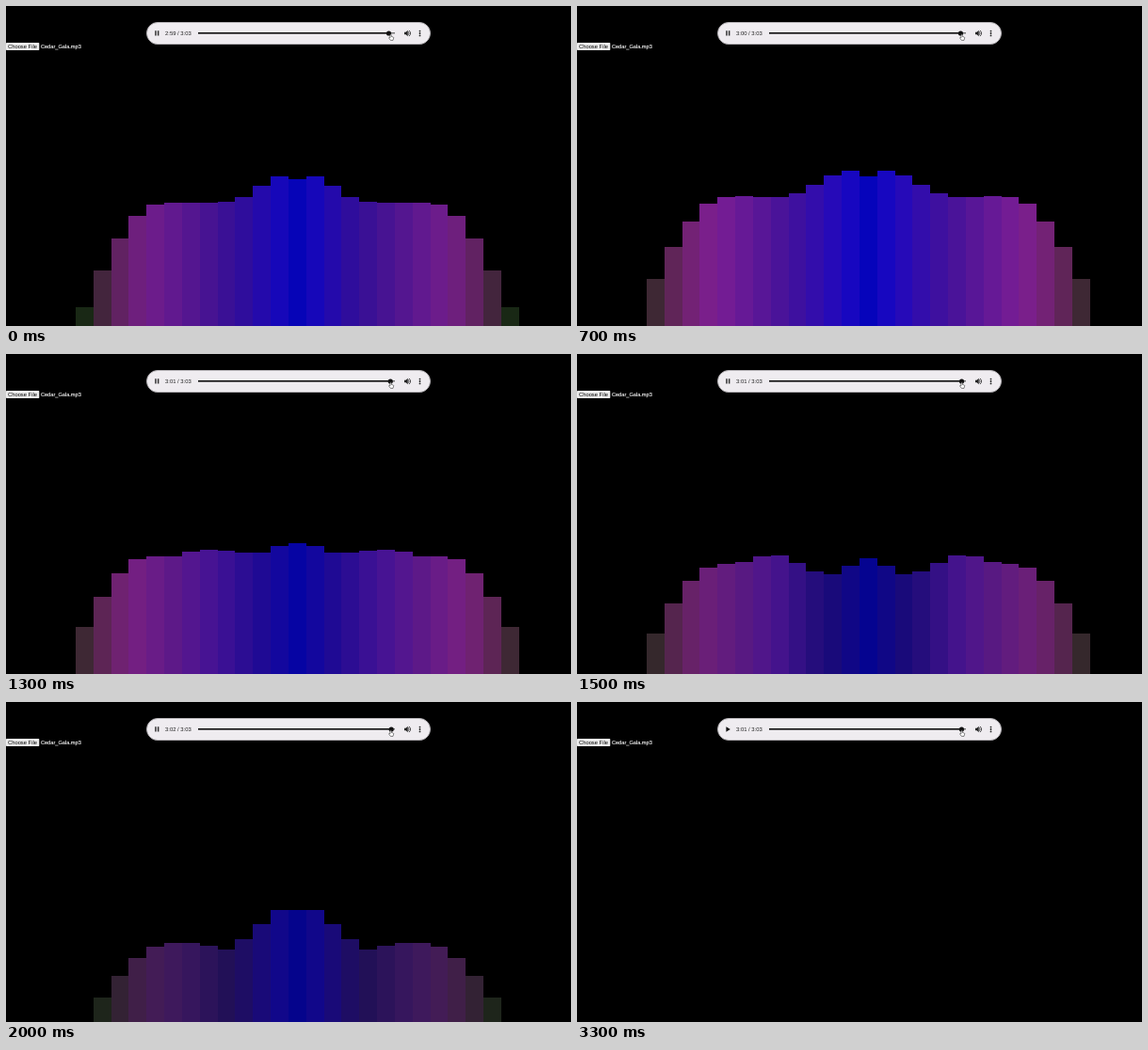
These frames come from a looping animation (600 px wide and 340 px high, 3500 ms). An HTML page:

```html
<!DOCTYPE html>
<html lang="en">
<head>
<meta charset="utf-8">
<title>Audio visualizer</title>
<style>
  html, body { margin: 0; width: 100%; height: 100%; overflow: hidden; background: #000; }
  svg { display: block; width: 600px; height: 340px; }
  text { font-family: "Liberation Sans", Arial, sans-serif; font-size: 5.8px; text-rendering: geometricPrecision; }
</style>
</head>
<body>
<svg viewBox="0 0 600 340">
  <g id="bars" shape-rendering="crispEdges"></g>

  <rect y="39" width="35.3" height="8" rx=".8" fill="#eee"/>
  <text x="2" y="45" fill="#000">Choose File</text>
  <text x="36.9" y="45" fill="#fff" stroke="#fff" stroke-width=".12" style="font-size:5.65px">Cedar_Gala.mp3</text>

  <rect x="149.5" y="17.5" width="301" height="23" rx="11.5" fill="#efecf0" stroke="#b4b1b5"/>
  <path id="pause" d="M158.2 26.3h1.5v5.2h-1.5zM160.9 26.3h1.5v5.2h-1.5z" fill="#333"/>
  <path id="play" d="M158.4 26.2l4.4 2.8-4.4 2.8z" fill="#111"/>
  <text id="clock" x="169" y="31.1" fill="#222" style="font-size:5.9px"></text>
  <path d="M204 28.7h209" stroke="#777" stroke-width="1.5"/>
  <path id="played" stroke="#111" stroke-width="1.6"/>
  <circle id="thumb" cy="29" r="2.6" fill="#111"/>

  <path d="M423 27.7h1.6l2.1-2v6.6l-2.1-2H423z" fill="#222"/>
  <path d="M427.4 27.3q1.3 1.7 0 3.4M428 25.9q3.2 3.1 0 6.2" fill="none" stroke="#222" stroke-width=".8"/>
  <path d="M439.5 26.6v0M439.5 29v0M439.5 31.4v0" stroke="#222" stroke-width="1.8" stroke-linecap="round"/>
  <path d="M407.9 30.6q.7-.7 1.3 0v1.8l2 .6q.6.3.4 1.2l-.6 2.2h-2.6l-1.8-2.4q0-.9.9-.6l.4.4z"
        fill="#fff" stroke="#333" stroke-width=".6"/>
</svg>
<script>
const LOOP = 3500, STEP = 100, FLOOR = 340;
const LEFT = 73.9, WIDTH = 18.83, CENTER = 12, SHOULDER = 5;
const FADE_AT = 2000, FADE_RATE = 0.3;
const DRAG_AT = 2600, PAUSED_AT = 2900;
const FIRST_SECOND = 179, PAUSED_SECOND = 181, LENGTH = 183;

// Each spectrum rises along a sine to its level; bumps are [rank, height, spread].
const poses = [
  { at: 0,    level: 131, shift: 0.5, bumps: [[11.3, 29, 1.3]] },
  { at: 400,  level: 128, shift: 1,   bumps: [[5, 14, 1.1], [11, 36, 1.5]] },
  { at: 1000, level: 132, shift: 1.5, bumps: [[3.5, 6, 0.7], [10.8, 34, 2.4]] },
  { at: 1500, level: 117, shift: 1.2, bumps: [[6.6, 10, 0.9], [9.8, -12, 0.9], [12, 7, 0.8]] },
  { at: 2000, level: 84,  shift: 0,   bumps: [[8, -8, 0.7], [11.5, 37, 1.35]] }
];

const $ = id => document.getElementById(id);
const set = (el, attrs) => { for (const k in attrs) el.setAttribute(k, attrs[k]); };
const lerp = (a, b, p) => a + (b - a) * p;
const bell = (x, spread) => Math.exp(-((x / spread) ** 2) / 2);
const timeText = s => `${Math.floor(s / 60)}:${String(s % 60).padStart(2, "0")}`;

const bars = [];
for (let i = 0; i <= 2 * CENTER; i++) {
  const el = document.createElementNS("http://www.w3.org/2000/svg", "rect");
  const x = Math.round(LEFT + i * WIDTH);
  set(el, { x, width: Math.round(LEFT + (i + 1) * WIDTH) - x });
  $("bars").append(el);
  bars.push({ el, rank: CENTER - Math.abs(i - CENTER) });
}

function spectrum({ level, shift, bumps }, rank) {
  const rise = Math.sin(Math.PI / 2 * Math.min(1, (rank + shift) / SHOULDER));
  return bumps.reduce((h, [at, size, spread]) => h + size * bell(rank - at, spread), level * rise);
}

function heightAt(rank, t) {
  const i = poses.findLastIndex(p => p.at <= t);
  const a = poses[i], b = poses[i + 1];
  if (b) return lerp(spectrum(a, rank), spectrum(b, rank), (t - a.at) / (b.at - a.at));
  return Math.max(0, spectrum(a, rank) - (t - FADE_AT) * FADE_RATE);
}

function color(rank, h) {
  const r = h * (1.24 - 0.1 * rank), g = 40 - 3 * rank, b = h * (1.03 + 0.012 * rank);
  return `rgb(${[r, g, b].map(Math.round)})`;
}

function draw(now) {
  const t = Math.floor((now % LOOP) / STEP) * STEP;
  const paused = t >= PAUSED_AT;
  for (const { el, rank } of bars) {
    const h = Math.round(heightAt(rank, t));
    set(el, { y: FLOOR - h, height: h, fill: color(rank, h) });
  }
  const x = t < DRAG_AT
    ? lerp(406.5, 410, t / DRAG_AT)
    : lerp(410, 408, (t - DRAG_AT) / (LOOP - DRAG_AT));
  set($("thumb"), { cx: x });
  set($("played"), { d: `M204 28.7H${x}` });
  const second = paused ? PAUSED_SECOND : FIRST_SECOND + Math.floor((t + 700) / 900);
  $("clock").textContent = `${timeText(second)} / ${timeText(LENGTH)}`;
  set($("play"), { visibility: paused ? "visible" : "hidden" });
  set($("pause"), { visibility: paused ? "hidden" : "visible" });
}

const start = performance.now();
function frame() {
  draw(performance.now() - start);
  requestAnimationFrame(frame);
}
frame();
</script>
</body>
</html>
```
